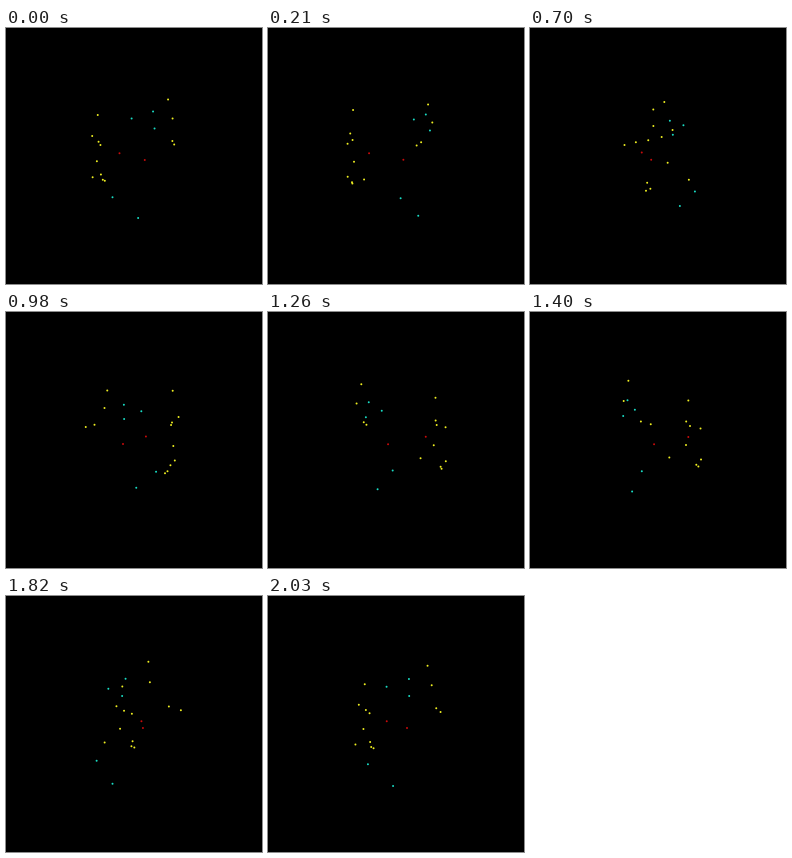
An HTML page with a canvas for the animation above (2100 ms loop, 256 by 256 pixels).

```html
<!DOCTYPE html>
<html lang="en">
<head>
<meta charset="utf-8">
<title>Turning points</title>
<style>
  html, body { margin: 0; width: 100%; height: 100%; overflow: hidden; background: #000; }
  canvas { display: block; width: 256px; height: 256px; }
</style>
</head>
<body>
<canvas id="stage" width="256" height="256"></canvas>
<script>
const ctx = document.getElementById('stage').getContext('2d');
const STEP = 70, STEPS = 30, TURN = Math.PI * 2;
const CENTER = 128, CAMERA = 228, DOT = 1;
const YELLOW = '#eeee20', CYAN = '#18dcc4', RED = '#c80a0a';

// Nested shells around a vertical axis, each flatter at the front by its lean.
// Spots are [degrees from the front, height].
const LEAN = 11, MIDDLE = 40.5, GAP = 4.6;
const shells = [
  { base: MIDDLE + GAP, lean: LEAN, spots: [[19, -24], [56, -35], [101, -12.5], [-42, 35.5]] },
  { base: MIDDLE, lean: LEAN, spots: [
    [57, -53.5], [87, -15.5], [243, -21], [219, -12.5], [218, 21],
    [269, 20.5], [22, -39.5], [-16, -32.5], [-5, 54]
  ] },
  { base: MIDDLE - GAP, lean: LEAN, spots: [[235, -44], [232, -15.5], [239, 5.5], [220, 26.5], [215.5, 28]] },
  { base: 11.7, lean: 20, color: RED, spots: [[200, -3], [88, 4]] }
];

const dots = shells.flatMap(({ base, lean, color, spots }) =>
  spots.map(([degrees, height]) => {
    const angle = degrees / 360 * TURN;
    const radius = base - lean * Math.cos(angle);
    const front = radius * Math.cos(angle) > 24;
    return { angle, radius, height, color: color || (front ? CYAN : YELLOW) };
  }));

function drawDot({ angle, radius, height, color }, turn) {
  const side = radius * Math.sin(angle + turn);
  const depth = radius * Math.cos(angle + turn);
  const scale = CAMERA / (CAMERA - depth);
  ctx.fillStyle = color;
  ctx.beginPath();
  ctx.arc(CENTER + side * scale, CENTER + height * scale, DOT, 0, TURN);
  ctx.fill();
}

function draw(time) {
  const step = Math.floor(time / STEP) % STEPS;
  const turn = (step + 1) / STEPS * TURN;
  ctx.fillStyle = '#000';
  ctx.fillRect(0, 0, 256, 256);
  for (const dot of dots) drawDot(dot, turn);
}

const start = performance.now();
function tick() {
  draw(performance.now() - start);
  requestAnimationFrame(tick);
}
tick();
</script>
</body>
</html>
```
